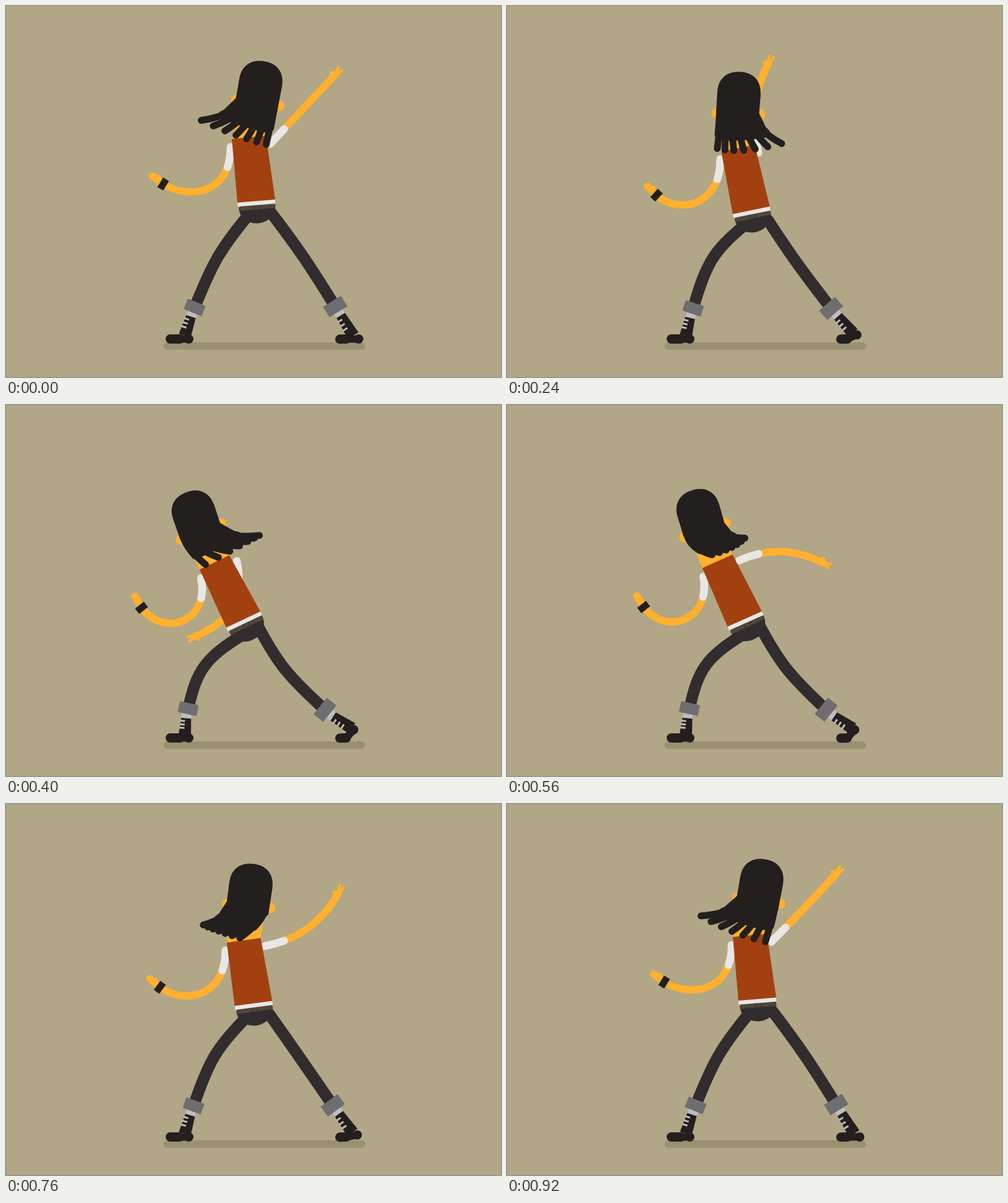
An HTML page with a canvas that plays this animation: 800 px wide and 600 px high, repeating every 960 ms.

```html
<!DOCTYPE html>
<html lang="en">
<head>
<meta charset="utf-8">
<title>Windmill dancer</title>
<style>
  html, body { margin: 0; width: 100%; height: 100%; overflow: hidden; background: #b1a686; }
  canvas { display: block; width: 800px; height: 600px; }
</style>
</head>
<body>
<canvas id="stage" width="800" height="600"></canvas>
<script>
const g = document.getElementById('stage').getContext('2d');
const LOOP = 960, STEP = 40;
const C = {
  bg: '#b1a686', shade: '#9a8f71', skin: '#ffb02e', hair: '#231f1e', white: '#e8e7e6',
  vest: '#a2410f', belt: '#50463a', trousers: '#312c2d', cuff: '#6e6d70', sock: '#bdbec0'
};

// Each value is given for three leans of the body: upright, halfway, bent.
const MID = 0.346;
const TORSO = {
  tl: [365, 215, 347, 235, 313, 266], tr: [420, 210, 401, 224, 361, 243],
  bl: [374, 318, 365, 336, 356, 360], br: [435, 313, 425, 324, 411, 334],
  head: [411.5, 124, 376, 141, 303.5, 174], tilt: [8, 2, -21],
  shoulder: [427, 223, 407, 237, 373, 252]
};
const ARM = {
  a: [363, 228, 345, 247, 315, 280], b: [363, 305, 346, 323, 330, 345],
  c: [295, 313, 277, 337, 260, 380], d: [254, 288, 242, 305.5, 219, 328],
  hand: [237, 275, 227, 291, 208.5, 309.5], thumb: [248, 275.5, 237, 293, 212, 312]
};
const LEGS = {
  hipL: [391, 339, 383, 355, 385, 370], kneeL: [336, 400, 321, 398, 303, 412],
  cuffL: [305, 487.5, 301, 489, 294.5, 491], turnL: [22, 18, 12],
  hipR: [429, 335, 422, 346, 409, 361], kneeR: [482, 403, 464, 412, 441, 430],
  cuffR: [532, 486, 524, 489, 515.5, 493], turnR: [-32, -41, -51],
  ankleR: [561, 533, 559, 529, 559, 523], heelR: [570, 538.5, 565.5, 532, 562, 525]
};

// time, arm angle, arm reach, arm bend, then first, middle and last hair tip from the head
const SWING = [
  [0, 46.8, 153, 0, -96, 61, -40, 85, 9, 100],
  [160, 53.1, 150, 8, -59, 81, -12, 94, 38, 94],
  [240, 83.7, 145, 14, -35, 89, 8, 92, 69, 81],
  [400, 241.5, 138, 29, 19, 84, 74, 54, 106, 37],
  [560, 358.5, 134, 16, 22, 71, 54, 59, 75, 44],
  [760, 395.5, 146, -17, -77, 64, -52, 74, -18, 85],
  [920, 406.3, 152, -1, -98, 57, -48, 82, 6, 99]
];

const rad = d => d * Math.PI / 180;
const mix = (a, b, f) => [a[0] + (b[0] - a[0]) * f, a[1] + (b[1] - a[1]) * f];
const quad = (a, b, c, f) => mix(mix(a, b, f), mix(b, c, f), f);
function unit(a, b) {
  const l = Math.hypot(b[0] - a[0], b[1] - a[1]);
  return [(b[0] - a[0]) / l, (b[1] - a[1]) / l];
}
// Maps local points to the stage
const frame = (o, angle) => {
  const c = Math.cos(angle), s = Math.sin(angle);
  return (x, y) => [o[0] + x * c - y * s, o[1] + x * s + y * c];
};

function ease(x, x1, x2) {
  let lo = 0, hi = 1, s = 0.5;
  for (let i = 0; i < 24; i++) {
    s = (lo + hi) / 2;
    const v = 3 * (1 - s) * (1 - s) * s * x1 + 3 * (1 - s) * s * s * x2 + s * s * s;
    if (v < x) lo = s; else hi = s;
  }
  return s * s * (3 - 2 * s);
}
const leanAt = t => 1.009 * (t < 440 ? ease(t / 440, 0.84, 0.41) : 1 - ease((t - 440) / 480, 0.7, 0.345));

function pose(rig, u) {
  const w = [(u - MID) * (u - 1) / MID, u * (u - 1) / (MID * (MID - 1)), u * (u - MID) / (1 - MID)];
  const out = {};
  for (const k in rig) {
    const v = rig[k];
    out[k] = v.length === 3
      ? rad(v[0] * w[0] + v[1] * w[1] + v[2] * w[2])
      : [0, 1].map(i => v[i] * w[0] + v[i + 2] * w[1] + v[i + 4] * w[2]);
  }
  return out;
}

// Smooth periodic curve through the swing rows
function swingAt(t) {
  const n = SWING.length;
  const row = i => {
    const turns = Math.floor(i / n);
    const r = SWING[i - turns * n].slice();
    r[0] += turns * LOOP;
    r[1] += turns * 360;
    return r;
  };
  let i = 0;
  while (i < n - 1 && SWING[i + 1][0] <= t) i++;
  const [p, a, b, q] = [row(i - 1), row(i), row(i + 1), row(i + 2)];
  const h = b[0] - a[0], f = (t - a[0]) / h, f2 = f * f, f3 = f2 * f;
  return a.map((v, k) => {
    const ma = (b[k] - p[k]) / (b[0] - p[0]) * h, mb = (q[k] - a[k]) / (q[0] - a[0]) * h;
    return v * (2 * f3 - 3 * f2 + 1) + ma * (f3 - 2 * f2 + f) + b[k] * (3 * f2 - 2 * f3) + mb * (f3 - f2);
  });
}

function fill(color, pts) {
  g.fillStyle = color;
  g.beginPath();
  pts.forEach(p => g.lineTo(...p));
  g.closePath();
  g.fill();
}
function dot(color, p, r) {
  g.fillStyle = color;
  g.beginPath();
  g.arc(p[0], p[1], r, 0, 7);
  g.fill();
}
// Strokes a line, a quadratic or a cubic, depending on the number of points
function stroke(color, width, pts, cap = 'round', dash = []) {
  const p = pts.flat();
  g.strokeStyle = color;
  g.lineWidth = width;
  g.lineCap = cap;
  g.setLineDash(dash);
  g.beginPath();
  g.moveTo(p[0], p[1]);
  if (pts.length === 2) g.lineTo(p[2], p[3]);
  else if (pts.length === 3) g.quadraticCurveTo(...p.slice(2));
  else g.bezierCurveTo(...p.slice(2));
  g.stroke();
  g.setLineDash([]);
}
const box = (color, at, x, y, w, h) =>
  fill(color, [at(x, y), at(x + w, y), at(x + w, y + h), at(x, y + h)]);

function sleevedArm(pts) {
  stroke(C.skin, 12, pts);
  stroke(C.white, 12.4, pts, 'round', [33, 999]);
}

function swingArm(from, [, angle, reach, bend]) {
  const a = rad(angle), d = [Math.cos(a), -Math.sin(a)];
  const end = [from[0] + d[0] * reach, from[1] + d[1] * reach];
  const m = mix(from, end, 0.5);
  const ctrl = [m[0] + d[1] * bend * 2, m[1] - d[0] * bend * 2];
  sleevedArm([from, ctrl, end]);
  const t = unit(ctrl, end), at = frame(end, Math.atan2(t[1], t[0]));
  stroke(C.skin, 9, [at(0, 0), at(4, 0)]);
  stroke(C.skin, 4.5, [at(3, -2), at(13, -4)]);
  stroke(C.skin, 4.5, [at(3, 2), at(13, 3)]);
  stroke(C.skin, 4.5, [at(4, -2), at(-2, -7.5)]);
}

function bandArm(p) {
  sleevedArm([p.a, p.b, p.c, p.d]);
  stroke(C.skin, 12, [p.d, p.hand]);
  stroke(C.skin, 6, [mix(p.d, p.hand, 0.5), p.thumb]);
  const t = unit(p.c, p.d);
  box(C.hair, frame(p.d, Math.atan2(t[1], t[0])), -5.5, -9, 11, 18);
}

function leg(hip, knee, cuff, turn, w, h, ankle, toe, ball, heel) {
  const at = frame(cuff, turn);
  // Straight thigh and shin with a tight bend at the knee
  const bend = mix(knee, mix(hip, cuff, 0.5), 0.22);
  stroke(C.trousers, 18.7, [hip, mix(hip, bend, 0.85), mix(cuff, bend, 0.85), cuff]);
  box(C.sock, at, -8, h / 2 - 1, 16, 9);
  const top = at(0, h / 2 + 7), d = unit(top, ankle), n = [-d[1], d[0]];
  const side = (p, s) => [p[0] + n[0] * s, p[1] + n[1] * s];
  fill(C.hair, [side(top, 8), side(top, -8), side(ankle, -10), side(ankle, 10)]);
  stroke(C.hair, 15, [toe, ball]);
  stroke(C.hair, 12, [ball, heel]);
  dot(C.hair, heel, 7.5);
  for (const f of [0.18, 0.39, 0.6]) {
    const p = mix(top, ankle, f);
    stroke(C.sock, 3, [side(p, 9.5), side(p, 1.5)], 'butt');
  }
  box(C.cuff, at, -w / 2, -h / 2, w, h);
}

function torso(p) {
  const base = mix(p.bl, p.br, 0.5), d = unit(p.bl, p.br);
  const at = frame(base, Math.atan2(d[1], d[0]));
  g.fillStyle = C.trousers;
  g.beginPath();
  g.moveTo(...at(-29, 8));
  g.bezierCurveTo(...at(-30, 26), ...at(-15, 36), ...at(0, 36));
  g.bezierCurveTo(...at(15, 36), ...at(30, 26), ...at(30, 8));
  g.fill();
  box(C.belt, at, -28, 6, 58, 7.5);
  box(C.trousers, at, -4.5, 6, 1, 8);
  box(C.trousers, at, 4.5, 6, 1, 8);
  box(C.white, at, -30.5, -1, 61, 7.5);
  fill(C.vest, [p.tl, p.tr, p.br, p.bl]);
}

function hair(head, at, s) {
  const tips = [0, 1, 2].map(i => [head[0] + s[4 + i * 2], head[1] + s[5 + i * 2]]);
  const strands = [];
  for (let i = 0; i < 7; i++) {
    const f = i / 6, x = -29 + 55 * f;
    const w = [2 * (f - 0.5) * (f - 1), 4 * f * (1 - f), 2 * f * (f - 0.5)];
    const tip = [0, 1].map(k => tips[0][k] * w[0] + tips[1][k] * w[1] + tips[2][k] * w[2]);
    strands.push([at(x, 30), at(x, 56), tip]);
  }
  // Slightly squared dome
  const cap = [], round = v => 35 * Math.sign(v) * Math.abs(v) ** 0.88;
  for (let a = 180; a <= 360; a += 6) cap.push(at(round(Math.cos(rad(a))), round(Math.sin(rad(a)))));
  const fringe = strands.map(p => quad(...p, 0.77)).reverse();
  fill(C.hair, [...cap, at(33, 30), ...fringe, at(-36, 30)]);
  // Keeps the back of the head closed
  fill(C.hair, [at(-35, 0), at(35, 0), at(33, 44), at(20, 57), at(-20, 57), at(-34, 44)]);
  for (const [root, ctrl, tip] of strands) {
    stroke(C.hair, 11, [root, ctrl, tip]);
    stroke(C.hair, 14, [root, mix(root, ctrl, 0.65), quad(root, ctrl, tip, 0.65)]);
  }
}

function draw(t) {
  const u = leanAt(t), s = swingAt(t);
  const body = pose(TORSO, u), arm = pose(ARM, u), l = pose(LEGS, u);
  const at = frame(body.head, body.tilt);

  g.fillStyle = C.bg;
  g.fillRect(0, 0, 800, 600);
  stroke(C.shade, 12, [[260.5, 550], [574.5, 550]]);

  swingArm(body.shoulder, s);
  bandArm(arm);
  leg(l.hipL, l.kneeL, l.cuffL, l.turnL, 31, 18, [289, 533], [265.5, 538.5], [281, 538.5], [295.5, 538.5]);
  leg(l.hipR, l.kneeR, l.cuffR, l.turnR, 34, 20, l.ankleR, [539.5, 538.8], [550, 538.5], l.heelR);
  fill(C.skin, [body.tl, at(-27, 40), at(27, 40), body.tr]);
  torso(body);
  dot(C.skin, at(-35, 33), 8.5);
  dot(C.skin, at(35, 33), 8.5);
  hair(body.head, at, s);
}

function tick(now) {
  draw(Math.floor(now / STEP) * STEP % LOOP);
  requestAnimationFrame(tick);
}
draw(0);
requestAnimationFrame(tick);
</script>
</body>
</html>
```
